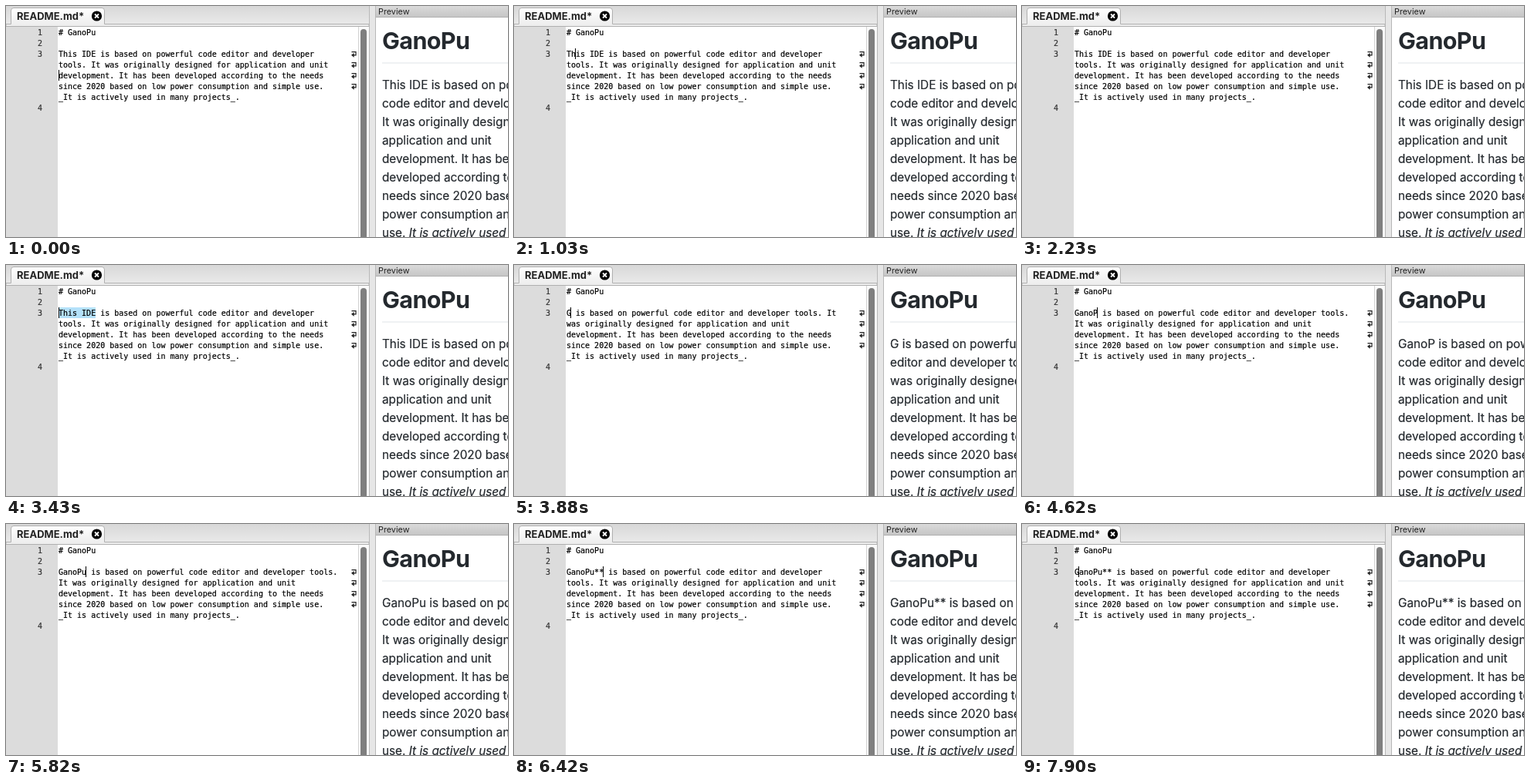
An HTML page that plays this animation: 650 px wide and 300 px high, repeating every 8 s.

```html
<!DOCTYPE html>
<html lang="en">
<head>
<meta charset="utf-8">
<title>Markdown editor with live preview</title>
<style>
  html, body { margin: 0; width: 100%; height: 100%; overflow: hidden; }
  #stage { position: relative; width: 650px; height: 300px; overflow: hidden; background: #fff; font-family: Inter, "Open Sans", sans-serif; }
  #stage div, #stage svg { position: absolute; white-space: pre; }

  .tabs { left: 0; top: 0; width: 470px; height: 27px; background: linear-gradient(#d8d8d8, #ececec); }
  .tab-name { left: 14px; top: 3px; font: 700 13px/20px Inter, sans-serif; color: #222; }

  .gutter { left: 0; top: 27px; width: 67px; height: 273px; background: #dcdcdc; }
  .mono { font: 10px/14px "DejaVu Sans Mono", monospace; color: #000; -webkit-text-stroke: .2px; }
  .num { left: 0; width: 47px; text-align: right; color: #333; }
  .code { left: 68px; }
  #mark { left: 68px; top: 55px; width: 48px; height: 14px; background: #b4e1fa; }
  #caret { width: 1px; height: 14px; background: #000; }

  .track { left: 456px; top: 27px; width: 14px; height: 273px; background: #fafafa; border-left: 1px solid #d4d4d4; box-sizing: border-box; }
  .thumb { left: 459px; top: 30px; width: 8px; height: 290px; border-radius: 4px; background: #7f7f7f; }
  .split { left: 470px; top: 0; width: 9px; height: 300px; background: #e6e6e6; border: solid #b8b8b8; border-width: 0 1px; box-sizing: border-box; }

  .head { left: 479px; top: 0; width: 171px; height: 15px; background: linear-gradient(#dadada, #c6c6c6); border-bottom: 1px solid #b0b0b0; box-sizing: border-box; }
  .head-name { left: 482px; top: 1px; font-size: 10.8px; line-height: 14px; color: #222; }
  .title { left: 487px; top: 25px; font-size: 30.5px; font-weight: 700; line-height: 40px; letter-spacing: -.02em; color: #24292e; }
  .rule { left: 487px; top: 73px; width: 163px; height: 2px; background: #eff1f3; }
  .prose { left: 487px; font-size: 15.3px; line-height: 24px; color: #24292e; -webkit-text-stroke: .2px; }
</style>
</head>
<body>
<div id="stage">
  <div class="tabs"></div>
  <svg width="470" height="27" viewBox="0 0 470 27">
    <defs>
      <linearGradient id="face" x2="0" y2="1">
        <stop offset="0" stop-color="#fff"/><stop offset="1" stop-color="#ececec"/>
      </linearGradient>
    </defs>
    <path d="M0 23.5H6.5V6Q6.5 2.5 10 2.5H124Q127.5 2.5 127.5 6V23.5H470V26.5H0Z" fill="url(#face)" stroke="#b0b0b0"/>
    <circle cx="117.5" cy="13" r="6.6"/>
    <path d="M115 10.5l5 5m0-5l-5 5" stroke="#fff" stroke-width="1.8"/>
  </svg>
  <div class="tab-name">README.md*</div>
  <div class="gutter"></div>
  <div id="mark"></div>
  <div class="track"></div>
  <div class="thumb"></div>
  <div class="split"></div>
  <div class="head"></div>
  <div class="head-name">Preview</div>
  <div class="rule"></div>
</div>
<script>
const NAME = 'GanoPu';
const LOOP = 8000;
const REST = ' is based on powerful code editor and developer tools. ' +
  'It was originally designed for application and unit development. ' +
  'It has been developed according to the needs since 2020 based on ' +
  'low power consumption and simple use. _It is actively used in many projects_.';

// time, opening words, caret column, caret row, state
const STEPS = [
  [0, 'This IDE', 0, 2],
  [300, 'This IDE', 0, 2, 'off'],
  [440, 'This IDE', 0, 1],
  [740, 'This IDE', 0, 0],
  [880, 'This IDE', 1, 0],
  [1030, 'This IDE', 2, 0],
  [1180, 'This IDE', 3, 0],
  [1330, 'This IDE', 4, 0],
  [1780, 'This IDE', 5, 0],
  [2230, 'This IDE', 5, 0, 'off'],
  [2680, 'This IDE', 6, 0],
  [2830, 'This IDE', 7, 0],
  [3130, 'This IDE', 8, 0],
  [3430, 'This IDE', 0, 0, 'marked'],
  ...[3730, 3880, 4020, 4170, 4320, 4620, 4770].map((t, n) => [t, NAME.slice(0, n), n, 0]),
  [5220, NAME, 6, 0, 'off'],
  [5820, NAME, 6, 0],
  [6120, NAME + '*', 7, 0],
  [6420, NAME + '**', 8, 0],
  [6870, NAME + '**', 7, 0],
  [7320, NAME + '**', 6, 0],
  [7470, NAME + '**', 5, 0],
  [7620, NAME + '**', 4, 0],
  [7770, NAME + '**', 2, 0],
  [7900, NAME + '**', 1, 0]
];

const stage = document.getElementById('stage');
const mark = document.getElementById('mark');

function add(cls, top, text = '') {
  const el = document.createElement('div');
  el.className = cls;
  el.style.top = top + 'px';
  el.textContent = text;
  stage.append(el);
  return el;
}

function addWrapSign(top) {
  stage.insertAdjacentHTML('beforeend',
    `<svg style="left:446px;top:${top}px" width="9" height="10">
      <path d="M1.5 1.6H7V5.8H4" fill="none" stroke="#222" stroke-width="1.2"/>
      <path d="M1 5.8L4.6 2.9V8.7Z" fill="#222"/></svg>`);
}

[28, 42, 56, 126].forEach((top, i) => add('mono num', top, i + 1));
add('mono code', 28, '# ' + NAME);
const codeRows = [0, 1, 2, 3, 4].map(i => add('mono code', 56 + 14 * i));
[0, 1, 2, 3].forEach(i => addWrapSign(58 + 14 * i));
const caret = add('', 55);
caret.id = 'caret';

add('title', 25, NAME);
const proseRows = [0, 1, 2].map(i => add('prose', 91 + 24 * i));
['application and unit', 'development. It has been', 'developed according to the',
  'needs since 2020 based on low', 'power consumption and simple', 'use. '
].forEach((line, i) => add('prose', 163 + 24 * i, line));
const em = document.createElement('em');
em.textContent = 'It is actively used in many';
stage.lastElementChild.append(em);

// Preview line breaks depend on how long the opening words are.
function proseLines(lead) {
  if (!lead) return ['is based on powerful code editor', 'and developer tools. It was', 'originally designed for'];
  if (lead.length < 5) return [lead + ' is based on powerful code', 'editor and developer tools. It', 'was originally designed for'];
  return [lead + ' is based on powerful', 'code editor and developer tools.', 'It was originally designed for'];
}

function show([, lead, col, row, state]) {
  const lines = (lead + REST).match(/.{1,60}(?: |$)/g);
  codeRows.forEach((el, i) => el.textContent = lines[i] || '');
  proseLines(lead).forEach((line, i) => proseRows[i].textContent = line);
  caret.style.left = (col ? 67 + 6 * col : 68) + 'px';
  caret.style.top = 55 + 14 * row + 'px';
  caret.style.visibility = state === 'off' ? 'hidden' : 'visible';
  mark.style.visibility = state === 'marked' ? 'visible' : 'hidden';
}

let current;
const start = performance.now();
function tick(now) {
  const t = Math.max(0, now - start) % LOOP;
  const step = STEPS.findLast(s => s[0] <= t);
  if (step !== current) show(current = step);
  requestAnimationFrame(tick);
}
tick(start);
</script>
</body>
</html>
```
